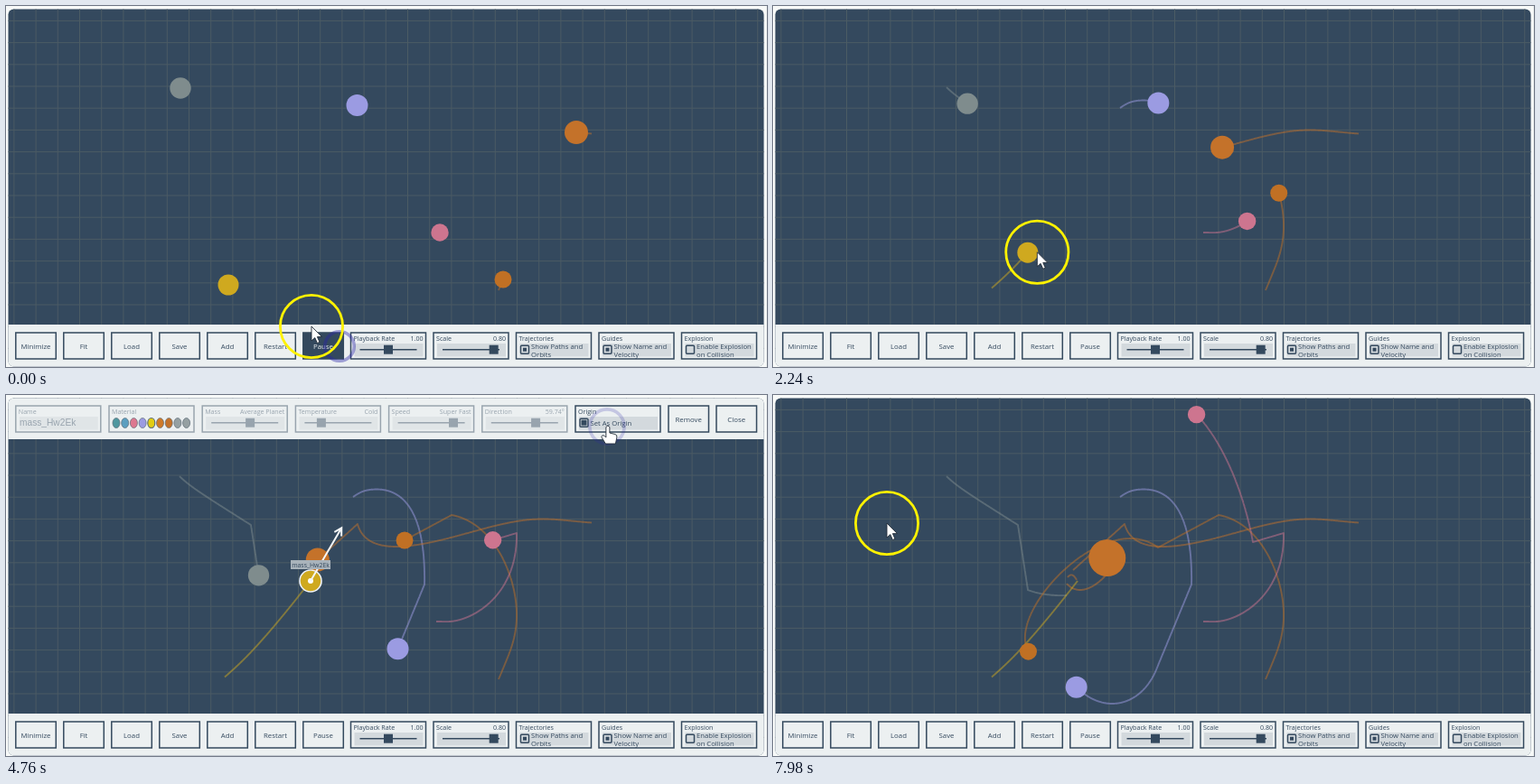
Animation of 842 by 400 pixels, one loop 8 s. Source, as an HTML page:

```html
<!DOCTYPE html>
<html lang="en">
<head>
<meta charset="utf-8">
<title>Orbit sandbox</title>
<style>
  html, body { margin: 0; width: 100%; height: 100%; overflow: hidden; background: #f8faf9; }
  svg { display: block; width: 842px; height: 400px; }
  text { font-family: "Open Sans", "Noto Sans", sans-serif; font-size: 7.1px; fill: #34495e; }
  .button { font-size: 7.8px; text-anchor: middle; }
  .option { font-size: 7.7px; }
  .end { text-anchor: end; }
  .box { fill: none; stroke: #34495e; stroke-width: 1.5; }
  .well { fill: #d3d9dd; }
  .ink { fill: #34495e; }
  .off { opacity: .45; }
</style>
</head>
<body>
<svg viewBox="0 0 842 400">
  <defs><clipPath id="frame"><rect x="2.5" y="3.5" width="836" height="396" rx="6"/></clipPath></defs>
  <rect x="841" width="1" height="400" fill="#e3e7e8"/>
  <g clip-path="url(#frame)">
    <rect width="842" height="400" fill="#34495e"/>
    <path id="grid" fill="none" stroke="#4b5b64"/>
    <g id="trails" fill="none" stroke-width="1.9" stroke-opacity=".5" stroke-linejoin="round"></g>
    <g id="bodies"></g>
    <g id="selection">
      <circle r="12" fill="none" stroke="#f4f6f7" stroke-width="1.6"/>
      <circle id="originDot" r="3" fill="#fff"/>
      <path id="arrow" fill="none" stroke="#f4f6f7" stroke-width="2"/>
      <rect x="-22" y="-23" width="44" height="10" fill="#a9b3bb"/>
      <text y="-15.5" text-anchor="middle" style="font-size:6.9px">mass_Hw2Ek</text>
    </g>
    <rect y="353" width="842" height="47" fill="#ecf0f1"/>
    <g id="toolbar"></g>
    <g id="panel"><rect width="842" height="49" fill="#ecf0f1"/></g>
  </g>
  <g id="clicks" fill="none" stroke="#2824a8" stroke-width="3.6"></g>
  <g id="pointer">
    <circle id="spot" r="34.6" fill="none" stroke="#fff200" stroke-width="2.8"/>
    <path id="pointerShape" fill="#fff" stroke="#222c38" stroke-width=".9" stroke-linejoin="round"/>
  </g>
</svg>
<script>
const LOOP = 8000, STEP = 140;
const SELECT = 2420, ORIGIN = 4000, IMPACT = 4980, MERGE = 5460;
const $ = id => document.getElementById(id);

function set(node, attrs) {
  for (const key in attrs) node.setAttribute(key, attrs[key]);
  return node;
}
function add(parent, name, attrs = {}) {
  return parent.appendChild(set(document.createElementNS('http://www.w3.org/2000/svg', name), attrs));
}
const show = (node, on) => set(node, { display: on ? 'inline' : 'none' });
const lerp = (a, b, k) => a + (b - a) * k;
const parse = text => text.split(' ').map(pair => pair.split(',').map(Number));

// The lowest-degree curve through the points at the given times.
function curve(times, points, t) {
  const weights = times.map((ti, i) =>
    times.reduce((w, tj, j) => i === j ? w : w * (t - tj) / (ti - tj), 1));
  return [0, 1].map(axis => points.reduce((sum, p, i) => sum + p[axis] * weights[i], 0));
}

// Motion is smooth within a phase and turns sharply where the frame of reference changes.
const FREE = [-250, 0, 1540, 2800, ORIGIN];
const RELATIVE = [ORIGIN, IMPACT];
const FUSE = [IMPACT, 5220, MERGE];
const AFTER = [IMPACT, 5880, 6860, LOOP];
const CORE = [MERGE, 5880, 6860, LOOP];

function makeBody(color, radius, phases, text) {
  const points = parse(text);
  let used = 0;
  const arcs = phases.map(times => {
    const arc = { times, points: points.slice(used, used + times.length) };
    used += times.length - 1;
    return arc;
  });
  const start = phases[0][0], end = phases[phases.length - 1].slice(-1)[0];
  const at = t => {
    const now = Math.max(start, Math.min(end, t));
    const { times, points } = arcs.find(arc => now <= arc.times[arc.times.length - 1]);
    return curve(times, points, now);
  };
  return {
    start, end, at,
    trail: add($('trails'), 'path', { stroke: color }),
    disc: add($('bodies'), 'circle', { r: radius, fill: color })
  };
}

const ORANGE = '#c4722a';
const bodies = [
  makeBody('#7f8c8d', 11.7, [FREE, RELATIVE, FUSE],
    '192,90 193,91 205,101 227,116 271,144 282,216 302,221 325,222'),
  makeBody('#9b9be2', 12, [FREE, RELATIVE, AFTER],
    '384,113 388.5,110 410,104.5 442,118.5 463,210 425,302 405,331 374,342 335,323'),
  makeBody(ORANGE, 13, [FREE, RELATIVE],
    '648,141.5 631,140 545,144 455,166 389,143 332,194'),
  makeBody(ORANGE, 17, [FUSE], '336,205 331,199.5 326,202'),
  makeBody(ORANGE, 20.5, [CORE], '325,209 340,216 373,194 369,181'),
  makeBody('#c07024', 9.5, [FREE, RELATIVE, AFTER],
    '545,315 550,303 565,241 548,178 493,133 426,169 364,166 301,217 283,285'),
  makeBody('#cd758f', 9.7, [FREE, RELATIVE, AFTER],
    '476,251 480,251 505.5,248 542,223 565,153 531,163 519,115 499,66 468,21'),
  makeBody('#cfa91f', 11.5, [FREE, RELATIVE],
    '242,312.5 246,309 269,287 295,258 337,206 337,206')
];
const chosen = bodies[bodies.length - 1];

// Pointer stops: time, then place.
const stops = parse('0,338,355 1540,320,263 2400,286,275 2800,405,263 3640,665,34 ' +
  '4900,666,34 5880,652,56 6860,578,166 7980,126,142');
const ARROW = 'M0 0V16L3.8 12.6 6.4 18.5 9 17.4 6.4 11.6H11.5Z';
const HAND = 'M-2 1.5Q0-1.5 2 1.5V8L8 9.5Q10.5 10 10 13L8.5 20H-2.5L-7 12.5Q-6.5 9.5-3.5 11.5L-2 13Z';
const clicks = parse('-520,369,377 2400,286,275 4000,665,35').map(([time, cx, cy]) =>
  ({ time, ring: add($('clicks'), 'circle', { cx, cy }) }));

function label(parent, x, y, content, cls = '') {
  const node = add(parent, 'text', { x, y, class: cls });
  node.textContent = content;
  return node;
}
function box(parent, x, y, width) {
  return add(parent, 'rect', { x, y, width, height: 29, class: 'box' });
}
function button(parent, x, y, content) {
  const frame = box(parent, x, y, 44.5);
  return { frame, text: label(parent, x + 22.2, y + 17.6, content, 'button') };
}
function field(parent, x, y, width, name) {
  box(parent, x, y, width);
  add(parent, 'rect', { x: x + 4, y: y + 12, width: width - 7, height: 14.5, class: 'well' });
  label(parent, x + 3, y + 9, name);
}
function slider(parent, x, y, width, name) {
  field(parent, x, y, width, name);
  add(parent, 'path', { d: `M${x + 10} ${y + 18.7}H${x + width - 10}`, class: 'box' });
  const value = label(parent, x + width - 3, y + 9, '', 'end');
  const thumb = add(parent, 'rect', { y: y + 13.7, width: 10, height: 10, class: 'ink' });
  return (text, k) => {
    value.textContent = text;
    set(thumb, { x: x + 5 + k * (width - 20) });
  };
}
function checkbox(parent, x, y, width, name, lines, size) {
  field(parent, x, y, width, name);
  add(parent, 'rect', { x: x + 5, y: y + 14.2, width: 9, height: 9, rx: 1, class: 'box' });
  lines.forEach((line, i) =>
    label(parent, x + 16.5, y + (lines.length > 1 ? 17.5 + 9 * i : 21.8), line, 'option'));
  return add(parent, 'rect', {
    x: x + 9.5 - size / 2, y: y + 18.7 - size / 2, width: size, height: size, class: 'ink'
  });
}

const toolbar = $('toolbar'), panel = $('panel');
const column = i => 381.5 + 91.5 * i;
const pause = ['Minimize', 'Fit', 'Load', 'Save', 'Add', 'Restart', 'Pause']
  .map((name, i) => button(toolbar, 10.8 + 53 * i, 362, name)).pop();
slider(toolbar, column(0), 362, 83, 'Playback Rate')('1.00', .5);
slider(toolbar, column(1), 362, 83, 'Scale')('0.80', .9);
checkbox(toolbar, column(2), 362, 83, 'Trajectories', ['Show Paths and', 'Orbits'], 4);
checkbox(toolbar, column(3), 362, 83, 'Guides', ['Show Name and', 'Velocity'], 4);
checkbox(toolbar, column(4), 362, 83, 'Explosion', ['Enable Explosion', 'on Collision'], 0);

const slot = i => 10.8 + 103.2 * i;
const locked = add(panel, 'g', { class: 'off' });
field(locked, slot(0), 12, 94, 'Name');
label(locked, 15, 34.3, 'mass_Hw2Ek').style.cssText = 'font:10.2px "Liberation Sans",sans-serif';
box(locked, slot(1), 12, 94);
label(locked, slot(1) + 3, 21, 'Material');
'#4f979f #5b9fc0 #dd7890 #9b9be2 #e3cd12 #cf7a28 #c4722a #95a0a2 #95a0a2'.split(' ').forEach((fill, i) =>
  add(panel, 'ellipse', {
    cx: 122 + 9.7 * i, cy: 31, rx: 4, ry: 5.5, fill,
    stroke: '#5d6c78', 'stroke-width': i === 4 ? 1.2 : .7
  }));
const [mass, temperature, speed, direction] = ['Mass', 'Temperature', 'Speed', 'Direction']
  .map((name, i) => slider(locked, slot(i + 2), 12, 94, name));
mass('Average Planet', .58);
temperature('Cold', .25);
const originMark = checkbox(panel, slot(6), 12, 94, 'Origin', ['Set As Origin'], 6);
button(panel, 733, 12, 'Remove');
button(panel, 786, 12, 'Close');

let grid = '';
for (let i = 0; i < 35; i++) grid += `M${8.9 + 24.2 * i} 0V353M0 ${16.4 + 24.2 * i}H842`;
set($('grid'), { d: grid });

function drawBody({ start, end, at, trail, disc }, t) {
  const points = [];
  const now = Math.min(t, end);
  for (let s = start; s < now; s += 10) points.push(at(s));
  points.push(at(now));
  set(trail, { d: 'M' + points.map(p => p.map(n => n.toFixed(1)).join(' ')).join('L') });
  const [cx, cy] = at(now);
  set(disc, { cx, cy });
  show(trail, t >= start);
  show(disc, t >= start && t < end);
}

function drawSelection(t) {
  const selected = t >= SELECT && t < IMPACT;
  show(panel, selected);
  show($('selection'), selected);
  if (!selected) return;
  const k = (t - 2800) / 1960;
  const degrees = lerp(49.63, 59.74, k), length = lerp(59, 68, k);
  set($('selection'), { transform: `translate(${chosen.at(t)})` });
  set($('arrow'), {
    d: `M0 0H${length}m-8-4.5l8 4.5-8 4.5`, transform: `rotate(${-degrees})`
  });
  show($('originDot'), t >= ORIGIN);
  show(originMark, t >= ORIGIN);
  speed(k > .5 ? 'Super Fast' : 'Fast', lerp(.67, .83, k));
  direction(degrees.toFixed(2) + '°', .5 + degrees / 360);
}

function drawPointer(t) {
  const next = Math.max(1, stops.findIndex(stop => stop[0] >= t));
  const [t0, x0, y0] = stops[next - 1], [t1, x1, y1] = stops[next];
  const k = (t - t0) / (t1 - t0);
  set($('pointer'), { transform: `translate(${lerp(x0, x1, k)} ${lerp(y0, y1, k)})` });
  set($('pointerShape'), { d: t > 3600 && t < IMPACT ? HAND : ARROW });
  show($('spot'), t < ORIGIN || t > IMPACT);
  for (const { time, ring } of clicks) {
    const age = (t - time) / 1000;
    show(ring, age >= 0 && age < 1);
    set(ring, { r: Math.max(0, 10 + 12 * age), opacity: .85 * (1 - age) });
  }
}

function draw(t) {
  bodies.forEach(body => drawBody(body, t));
  drawSelection(t);
  drawPointer(t);
  const hovered = t < STEP;
  pause.frame.style.fill = hovered ? '#34495e' : 'none';
  pause.text.style.fill = hovered ? '#ecf0f1' : '#34495e';
}

function tick() {
  const t = performance.now() % LOOP;
  draw(Math.floor(t / STEP) * STEP);
  requestAnimationFrame(tick);
}
tick();
</script>
</body>
</html>
```
